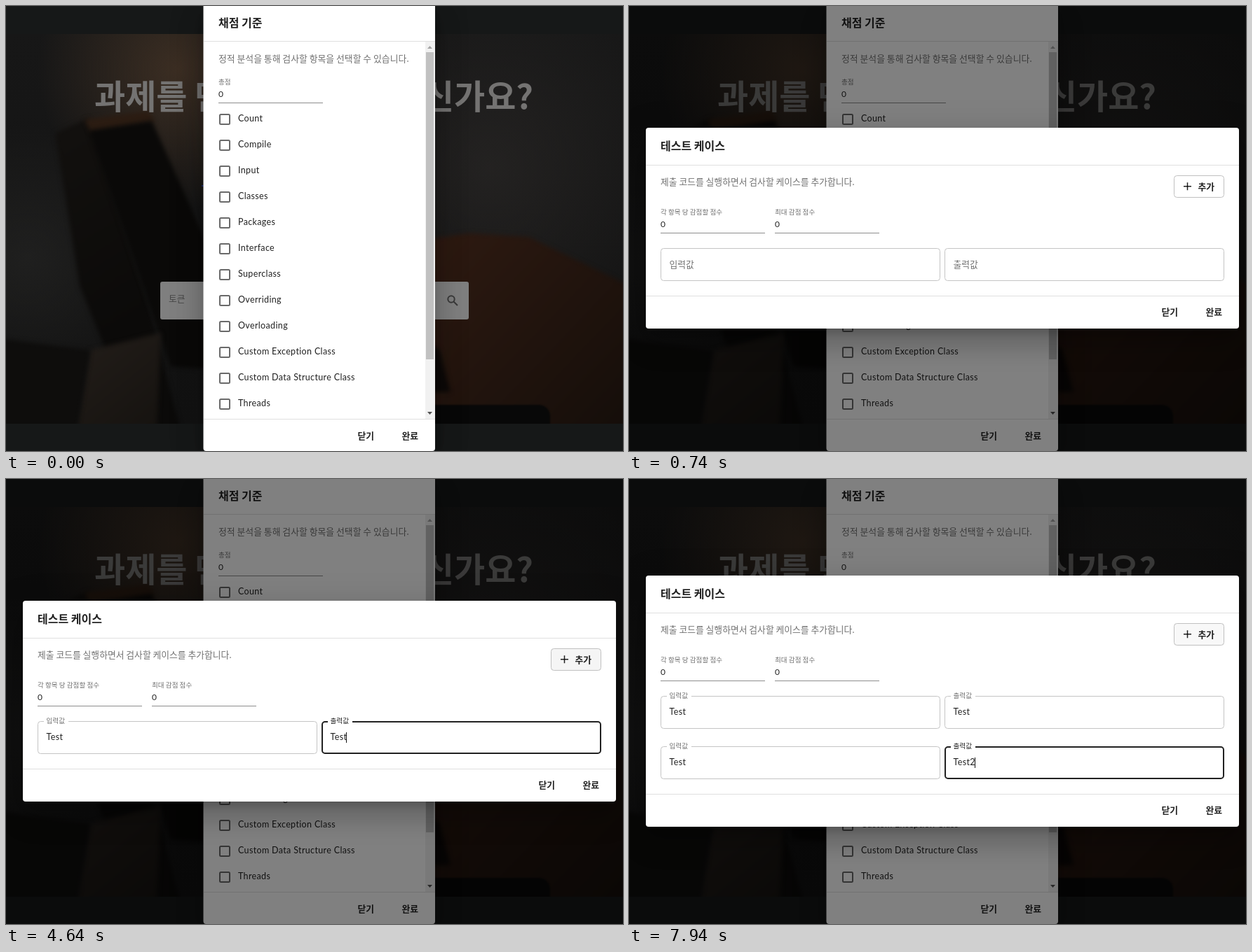
Recreate the animation shown at these times as an HTML page with a canvas. Size 880 by 636 pixels, loop 8000 ms.

```html
<!DOCTYPE html>
<html lang="ko">
<head>
<meta charset="utf-8">
<title>테스트 케이스</title>
<style>
html, body { margin: 0; width: 100%; height: 100%; overflow: hidden; background: #111; }
canvas { display: block; }
</style>
</head>
<body>
<canvas id="stage" width="880" height="636"></canvas>
<script>
const W = 880, H = 636, LOOP = 8000;
const KO = "'Noto Sans CJK KR', 'Noto Sans CJK JP', 'Noto Sans CJK', sans-serif";
const LATIN = "Lato, 'Open Sans', sans-serif";
const INK = 'rgba(0,0,0,.87)', SOFT = 'rgba(0,0,0,.56)', LINE = '#e0e0e0';

const makeCanvas = () => Object.assign(document.createElement('canvas'), { width: W, height: H });
const screen = document.getElementById('stage').getContext('2d');
const sheet = makeCanvas().getContext('2d');
const clamp = v => Math.max(0, Math.min(1, v));

function bezier(x1, y1, x2, y2) {
  const at = (a, b, s) => 3 * a * s * (1 - s) ** 2 + 3 * b * s * s * (1 - s) + s ** 3;
  return x => {
    x = clamp(x);
    let lo = 0, hi = 1;
    for (let i = 0; i < 24; i++) {
      const mid = (lo + hi) / 2;
      if (at(x1, x2, mid) < x) lo = mid; else hi = mid;
    }
    return at(y1, y2, (lo + hi) / 2);
  };
}
const easeInOut = bezier(.4, 0, .2, 1);
const easeOut = bezier(0, 0, .2, 1);

// Text is placed by its left edge and vertical centre.
function korean(c, str, x, mid, size, color, weight = 400) {
  c.font = `${weight} ${size}px ${KO}`;
  c.letterSpacing = '0px';
  c.fillStyle = color;
  c.fillText(str, x, mid + size * .38);
}
function latin(c, str, x, mid, size = 12.5) {
  c.font = `400 ${size}px ${LATIN}`;
  c.letterSpacing = '0.35px';
  c.fillStyle = INK;
  c.fillText(str, x, mid + size * .35);
  return c.measureText(str).width;
}
function rect(c, x, y, w, h, color) {
  c.fillStyle = color;
  c.fillRect(x, y, w, h);
}
function poly(c, color, ...pts) {
  c.fillStyle = color;
  c.beginPath();
  for (let i = 0; i < pts.length; i += 2) c.lineTo(pts[i], pts[i + 1]);
  c.fill();
}
function rounded(c, x, y, w, h, r) {
  c.beginPath();
  c.roundRect(x, y, w, h, r);
}
function outline(c, x, y, w, h, r, width, color) {
  rounded(c, x + width / 2, y + width / 2, w - width, h - width, r);
  c.lineWidth = width;
  c.strokeStyle = color;
  c.stroke();
}
function glow(c, x, y, r, rgb, alpha) {
  const g = c.createRadialGradient(x, y, 0, x, y, r);
  g.addColorStop(0, `rgba(${rgb},${alpha})`);
  g.addColorStop(1, `rgba(${rgb},0)`);
  rect(c, 0, 40, W, 557, g);
}
function fade(c, x1, y1, x2, y2, from, to) {
  const g = c.createLinearGradient(x1, y1, x2, y2);
  g.addColorStop(0, from);
  g.addColorStop(1, to);
  return g;
}
function paper(c, x, y, w, h) {
  const shadows = [[11, 15, -7, .2], [24, 38, 3, .14], [9, 46, 8, .12]];
  for (const [dy, blur, spread, alpha] of shadows) {
    c.save();
    c.shadowColor = `rgba(0,0,0,${alpha})`;
    c.shadowBlur = blur;
    c.shadowOffsetX = 2000;
    c.shadowOffsetY = dy;
    c.fillStyle = '#000';
    rounded(c, x - spread - 2000, y - spread, w + 2 * spread, h + 2 * spread, 4);
    c.fill();
    c.restore();
  }
  c.fillStyle = '#fff';
  rounded(c, x, y, w, h, 4);
  c.fill();
}

function drawPhoto(c) {
  c.save();
  c.beginPath();
  c.rect(0, 40, W, 557);
  c.clip();
  rect(c, 0, 40, W, 557, fade(c, 0, 40, 0, 597, '#171717', '#121212'));
  glow(c, 245, 90, 200, '66,50,37', .85);
  glow(c, 30, 360, 190, '36,36,35', .7);
  glow(c, 690, 230, 280, '40,38,37', .75);
  c.filter = 'blur(3px)';
  poly(c, fade(c, 600, 330, 880, 597, '#2e1a11', '#150e0a'),
    590, 335, 660, 325, 745, 330, 890, 400, 890, 610, 590, 610);
  poly(c, fade(c, 70, 200, 220, 440, '#12100e', '#0b0a09'),
    70, 182, 118, 160, 200, 420, 250, 610, 190, 610, 105, 400);
  poly(c, '#2b1c12', 112, 162, 204, 150, 212, 166, 122, 182);
  poly(c, '#0a0908', 118, 178, 208, 164, 300, 370, 300, 520, 235, 515);
  poly(c, fade(c, 120, 480, 215, 597, '#211c18', '#161310'),
    120, 492, 221, 467, 215, 610, 100, 610);
  poly(c, '#0e0d0c', -10, 475, 120, 492, 100, 610, -10, 610);
  poly(c, '#0c0908', 590, 480, 618, 490, 634, 552, 590, 552);
  c.filter = 'blur(1px)';
  c.fillStyle = '#080808';
  rounded(c, 560, 570, 216, 60, 16);
  c.fill();
  c.restore();
}

function drawPage(c) {
  rect(c, 0, 0, W, H, '#161818');
  drawPhoto(c);

  korean(c, '과제를 만', 126, 128.5, 48, '#747372', 700);
  c.textAlign = 'right';
  korean(c, '신가요?', 752, 128.5, 48, '#747372', 700);
  c.textAlign = 'left';
  rect(c, 279, 256, 3, 2, '#1c2a6a');

  c.fillStyle = '#7f7f7f';
  rounded(c, 220, 394, 440, 54, 3);
  c.fill();
  korean(c, '토큰', 232, 418, 12.8, '#484848');
  c.strokeStyle = '#3a3a3a';
  c.lineWidth = 2;
  c.beginPath();
  c.arc(635, 419, 4.7, 0, 7);
  c.moveTo(638.5, 422.5);
  c.lineTo(644, 428);
  c.stroke();
}

const CRITERIA = ['Count', 'Compile', 'Input', 'Classes', 'Packages', 'Interface', 'Superclass',
  'Overriding', 'Overloading', 'Custom Exception Class', 'Custom Data Structure Class', 'Threads'];

function drawCriteria(c, picked) {
  paper(c, 281.5, -4, 330.5, 640);
  korean(c, '채점 기준', 303, 24, 16, INK, 700);
  rect(c, 282, 50, 330, 1, LINE);
  korean(c, '정적 분석을 통해 검사할 항목을 선택할 수 있습니다.', 303, 75, 12.85, SOFT);
  numberField(c, '총점', 303, 108);

  CRITERIA.forEach((name, i) => {
    const mid = 161 + 37 * i, top = mid - 7;
    if (picked && name === 'Input') {
      c.fillStyle = '#3d5afe';
      rounded(c, 304, top, 16, 16, 2);
      c.fill();
      c.strokeStyle = '#fff';
      c.lineWidth = 1.8;
      c.beginPath();
      c.moveTo(306.5, top + 8);
      c.lineTo(310.3, top + 11.8);
      c.lineTo(317.7, top + 4.2);
      c.stroke();
    } else outline(c, 304, top, 16, 16, 1.5, 2, '#6a6a6a');
    latin(c, name, 331, mid);
  });

  rect(c, 598, 51, 14, 539, '#f1f1f1');
  rect(c, 599, 66, 11, 439, '#c1c1c1');
  poly(c, '#a3a3a3', 601, 61, 604.5, 57, 608, 61);
  poly(c, '#505050', 601, 580, 604.5, 584, 608, 580);
  rect(c, 282, 590, 330, 1, LINE);
  korean(c, '닫기', 501.5, 614, 12.8, INK, 700);
  korean(c, '완료', 564.5, 614, 12.8, INK, 700);
}

function numberField(c, label, x, mid) {
  korean(c, label, x, mid, 9.6, SOFT);
  latin(c, '0', x, mid + 18, 12);
  rect(c, x, mid + 30, 149, 1, '#8d8d8d');
}

const FIELDS = [
  { row: 0, x: 45, label: '입력값', hover: 1220, from: 1630, to: 3762, text: 'Test', keys: [2720, 3200, 3380, 3500] },
  { row: 0, x: 450, label: '출력값', from: 3762, to: 4935, text: 'Test', keys: [4160, 4400, 4520, 4580] },
  { row: 1, x: 45, label: '입력값', from: 5620, to: 6342, text: 'Test', keys: [6020, 6080, 6200, 6200] },
  { row: 1, x: 450, label: '출력값', from: 6342, to: LOOP, text: 'Test2', keys: [6860, 7160, 7340, 7400, 7640] }
];
const ROW_ADDED = 5000, PRESS = 4940, BUTTON_HOVER = 4640, OPEN = 493;

function drawField(c, f, top, t) {
  const focused = t >= f.from && t < f.to;
  const hovered = f.hover && t >= f.hover && t < f.from;
  const lift = easeOut((t - f.from) / 200);
  const notch = easeOut((t - f.from - 50) / 100);
  const textX = f.x + 12.5;
  outline(c, f.x, top, 399, 47, 4, focused ? 2 : 1, focused || hovered ? '#212121' : '#c4c4c4');
  if (notch > 0) rect(c, f.x + 9, top - 1, 35 * notch, 4, '#fff');
  korean(c, f.label, textX, top + 23 - 24 * lift, 12.8 - 3.2 * lift, focused ? INK : SOFT);

  const typed = f.keys.filter(k => k <= t);
  const width = latin(c, f.text.slice(0, typed.length), textX, top + 23);
  const last = typed.length ? typed[typed.length - 1] : f.from;
  if (focused && (t - last) % 1000 < 500) {
    rect(c, Math.floor(textX + (typed.length ? width - .5 : 0)), top + 16, 1, 15, '#111');
  }
}

function drawAddButton(c, y, t) {
  c.save();
  rounded(c, 777, y, 72, 32, 4);
  c.clip();
  if (t >= BUTTON_HOVER) rect(c, 777, y, 72, 32, t < ROW_ADDED ? '#f5f5f5' : '#f8f8f8');
  const age = (t - PRESS) / 540;
  if (age >= 0 && age < 1) {
    c.fillStyle = `rgba(0,0,0,${.25 * (1 - age)})`;
    c.beginPath();
    c.arc(816, y + 16, 8 + 46 * easeInOut(age), 0, 7);
    c.fill();
  }
  c.restore();
  outline(c, 777, y, 72, 32, 4, 1, '#c0c0c0');
  rect(c, 791, y + 15, 11, 1.5, INK);
  rect(c, 795.75, y + 10.25, 1.5, 11, INK);
  korean(c, '추가', 811.5, y + 16, 12.8, INK, 700);
}

function drawCases(c, t) {
  const extra = t >= ROW_ADDED ? 72 : 0;
  const y = 174 - extra / 2;
  c.clearRect(0, 0, W, H);
  paper(c, 24, y, 846, 287 + extra);
  korean(c, '테스트 케이스', 45, y + 26, 16, INK, 700);
  rect(c, 24, y + 53, 846, 1, LINE);
  korean(c, '제출 코드를 실행하면서 검사할 케이스를 추가합니다.', 45, y + 77, 12.8, SOFT);
  drawAddButton(c, y + 68, t);
  numberField(c, '각 항목 당 감점할 점수', 45, y + 120);
  numberField(c, '최대 감점 점수', 208, y + 120);
  for (const f of FIELDS) {
    if (f.row === 0 || extra) drawField(c, f, y + 172 + 72 * f.row, t);
  }
  const foot = y + 240 + extra;
  rect(c, 24, foot, 846, 1, LINE);
  korean(c, '닫기', 759.5, foot + 23, 12.8, INK, 700);
  korean(c, '완료', 822.5, foot + 23, 12.8, INK, 700);
}

const page = makeCanvas();
drawPage(page.getContext('2d'));

function render(t) {
  screen.drawImage(page, 0, 0);
  drawCriteria(screen, t >= 500);
  if (t < 500) return;
  const shown = easeInOut((t - OPEN) / 225);
  rect(screen, 0, 0, W, H, `rgba(0,0,0,${.5 * shown})`);
  drawCases(sheet, t);
  screen.globalAlpha = shown;
  screen.drawImage(sheet.canvas, 0, 0);
  screen.globalAlpha = 1;
}

const start = performance.now();
let lastStep = -1;
function tick() {
  const t = Math.max(0, performance.now() - start) % LOOP;
  const step = Math.max(0, Math.floor((t - 20) / 60) * 60 + 20);
  if (step !== lastStep) render(lastStep = step);
  requestAnimationFrame(tick);
}
tick();
</script>
</body>
</html>
```
